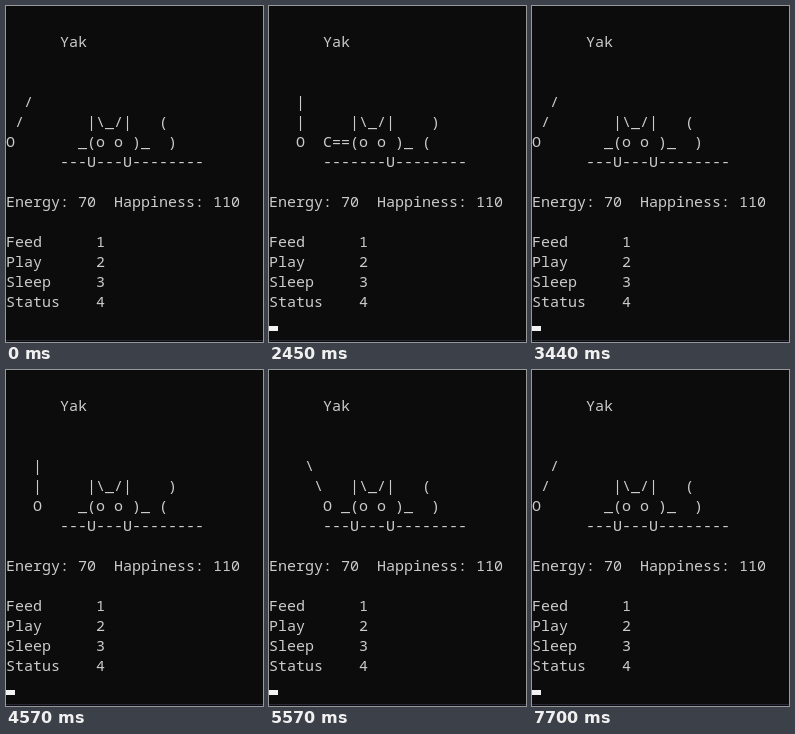
Animation of 257x336 px, one loop 8 s. Source, as an HTML page:

```html
<!DOCTYPE html>
<html lang="en">
<head>
<meta charset="utf-8">
<title>Console pet</title>
<style>
  html, body {
    margin: 0;
    width: 100%;
    height: 100%;
    overflow: hidden;
    background: #0c0c0c;
  }
  .stage {
    position: relative;
    width: 257px;
    height: 336px;
    overflow: hidden;
  }
  .stage * {
    animation-duration: 8s;
    animation-timing-function: step-end;
    animation-iteration-count: infinite;
  }
  .screen { position: absolute; inset: 0; animation-name: scroll; }
  pre {
    position: absolute;
    left: 0;
    margin: 0;
    color: #ccc;
    font: 15px/20px "Noto Sans Mono", "DejaVu Sans Mono", monospace;
    font-variant-ligatures: none;
  }
  .name { top: 25px; left: 54px; animation-name: blank; }
  .menu { top: 185px; animation-name: blank; }
  .pose { top: 85px; visibility: hidden; }
  .left { animation-name: left; }
  .middle { animation-name: middle; }
  .right { animation-name: right; }
  .paw { animation-name: paw; }
  .cursor {
    position: absolute;
    left: 0;
    top: 320px;
    width: 9px;
    height: 5px;
    background: #f2f2f2;
    animation-name: cursor;
  }
  .edge {
    position: absolute;
    left: 0;
    top: 334px;
    width: 100%;
    height: 1px;
    background: #29293b;
  }

  @keyframes blank {
    0%, 43% { visibility: visible; }
    42.125% { visibility: hidden; }
  }
  @keyframes scroll {
    0%, 69.625% { transform: none; }
    68.75% { transform: translateY(-20px); }
  }
  @keyframes left {
    0%, 43%, 96.25%, 100% { visibility: visible; }
    4%, 57.125% { visibility: hidden; }
  }
  @keyframes middle {
    0%, 15.75%, 69.625%, 100% { visibility: hidden; }
    4%, 57.125% { visibility: visible; }
  }
  @keyframes right {
    0%, 30.625%, 83.75%, 100% { visibility: hidden; }
    15.75%, 69.625% { visibility: visible; }
  }
  @keyframes paw {
    0%, 42.125%, 96.25%, 100% { visibility: hidden; }
    30.625%, 83.75% { visibility: visible; }
  }
  @keyframes cursor {
    0% { visibility: hidden; }
    4%, 100% { visibility: visible; }
  }
</style>
</head>
<body>
<div class="stage">
  <div class="screen">
<pre class="name">Yak</pre>
<pre class="pose left">
  /
 /       |\_/|   (
O       _(o o )_  )
      ---U---U--------</pre>
<pre class="pose middle">
   |
   |     |\_/|    )
   O    _(o o )_ (
      ---U---U--------</pre>
<pre class="pose right">
    \
     \   |\_/|   (
      O _(o o )_  )
      ---U---U--------</pre>
<pre class="pose paw">
   |
   |     |\_/|    )
   O  C==(o o )_ (
      -------U--------</pre>
<pre class="menu">
Energy: 70  Happiness: 110

Feed      1
Play      2
Sleep     3
Status    4</pre>
  </div>
  <div class="cursor"></div>
  <div class="edge"></div>
</div>
</body>
</html>
```
